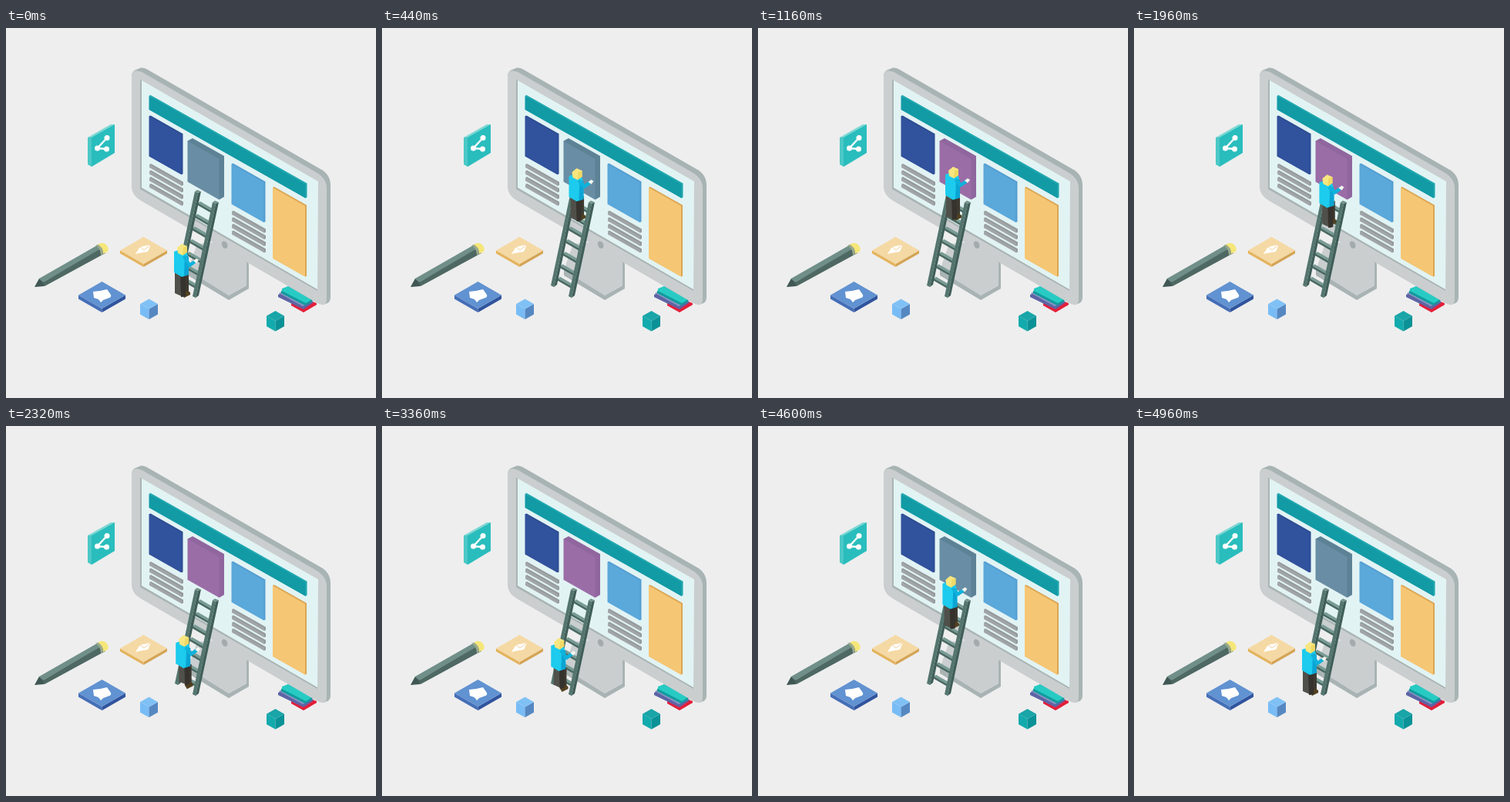
These frames come from a looping animation (480 px wide and 480 px high, 5 s). An HTML page:

```html
<!DOCTYPE html>
<html lang="en">
<head>
<meta charset="utf-8">
<title>Painting the page</title>
<style>
  html, body { margin: 0; width: 100%; height: 100%; overflow: hidden; background: #eee; }
  svg { display: block; width: 100%; height: 100%; }
</style>
</head>
<body>
<svg viewBox="0 0 480 480">
  <g id="stack">
    <path d="M370 357L390 352 403 357V359L386 369 370 360Z" fill="#e41f3a"/>
    <path d="M353 346L370 337 399 356 386 365 353 349Z" fill="#5d63a4"/>
    <path d="M354 344L369 336 399 354 385 361Z" fill="#8794c2"/>
    <path d="M357 341L366 335 397 352V355L388 360 357 344Z" fill="#129b9e"/>
    <path d="M358 338L366 335 397 352 389 357 358 341Z" fill="#27cbc3"/>
  </g>
  <g id="monitor">
    <path d="M236 314L289 347 313 333V302L272 278 248 280Z" fill="#cacecf"/>
    <path d="M236 314V321L289 353 315 338V304L312 302V334L289 347Z" fill="#a9b3b3"/>
    <path d="M163 63Q163 56 169 54L175 51.500Q178 51 182 53L408 183Q421 190 421 204V349Q421 355 417 357L411 359 170 70Z" fill="#a8b4b3"/>
    <path d="M163 63Q163 52 176 57L402 187Q416 195 416 208V352Q416 363 404 357L175 224Q163 217 163 206Z" fill="#cacecf"/>
    <path d="M174 67L176 68V207L404 339V341L174 209Z" fill="#a8b4b3"/>
    <path d="M176 68L405 199 404 339 176 207Z" fill="#e2f3f4"/>
    <ellipse cx="283.500" cy="281.500" rx="3.500" ry="5" transform="rotate(-25 283 281)" fill="#a4abad"/>
  </g>
  <g id="page"></g>
  <g id="share">
    <path d="M106 142L136 125 141 125 112 142Z" fill="#7cd8d4"/>
    <path d="M106 142L111 142V180L106 177Z" fill="#4cc8c6"/>
    <path d="M111 142L141 125V162L111 180Z" fill="#2abdbd"/>
    <path d="M131 142.500L118.500 156 130.500 157" fill="none" stroke="#fff" stroke-width="2.500"/>
    <g fill="#fff"><circle cx="131" cy="142.500" r="3.500"/><circle cx="118.500" cy="156" r="3.500"/><circle cx="130.500" cy="157" r="3.500"/></g>
  </g>
  <g id="pencil">
    <path d="M37 336L43 325 53 332 49 335Z" fill="#3f5854"/>
    <path d="M43 325L120 281Q124 279 127 285L48 330Z" fill="#708f89"/>
    <path d="M48 330L125 285 129 292 50 335Z" fill="#4e6862"/>
    <path d="M119 281Q125 277 130 281 134 286 132 290L126 293Q126 285 119 281Z" fill="#f5e678"/>
    <path d="M119 281Q126 284 126 293L123 295Q123 286 116 282Z" fill="#9aa98c"/>
  </g>
  <g id="tiles"></g>
  <path d="M168 293L174 284 188 281 184 290Z" fill="#fff"/>
  <path d="M174 284L179 288 188 281" fill="none" stroke="#f0d09a"/>
  <path d="M113 342L122 341 131 339 136 346Q137 349 134 350L126 353 123 356 120 352 114 350Z" fill="#fff"/>
  <g id="cubes"></g>
  <g id="ladder"></g>
  <g id="man">
    <g id="rightLeg">
      <path d="M228 317L237 318V343L229 347Z" fill="#3d3931"/>
      <path d="M228 344L236 341 239 343V346L231 350Z" fill="#51401f"/>
    </g>
    <g id="leftLeg">
      <path d="M219 314L230 319V349L219 344Z" fill="#50504b"/>
      <path d="M226 318L233 319V348L227 349Z" fill="#36322d"/>
    </g>
    <path d="M218 290L224 288 235 292 237 299V320L228 323 218 317Z" fill="#1ccbed"/>
    <path d="M232 295L237 297V320L231 322Z" fill="#0ba4d4"/>
    <path id="arm" fill="none" stroke="#0fb2dc" stroke-width="4.500" stroke-linejoin="round"/>
    <path id="hand" d="M-3 0L1 -3 4 -1 1 3Z" fill="#f4f7f0"/>
    <path d="M222 285L228 280 235 283 235 291 229 295 223 292Z" fill="#f7e680"/>
    <path d="M230 285L235 283V291L229 295Z" fill="#efd965"/>
  </g>
</svg>
<script>
const $ = id => document.getElementById(id);

function poly(parent, points, fill) {
  const shape = document.createElementNS("http://www.w3.org/2000/svg", "polygon");
  shape.setAttribute("points", points.join(" "));
  shape.setAttribute("fill", fill);
  $(parent).append(shape);
  return shape;
}

// Slab lying on the tilted screen; depth pushes its far edges up and right.
function slab(x, y, w, h, depth, face, edge) {
  const drop = w * 0.565, lift = depth * 0.55;
  const side = poly("page", [
    [x, y], [x + depth, y - lift], [x + w + depth, y + drop - lift],
    [x + w + depth, y + drop + h - lift], [x + w, y + drop + h]
  ], edge);
  const front = poly("page", [
    [x, y], [x + w, y + drop], [x + w, y + drop + h], [x, y + h]
  ], face);
  return { front, side };
}

// Block seen from above: x, y is the middle of its top face.
function block(group, x, y, rx, ry, h, top, left, right) {
  poly(group, [[x - rx, y], [x, y + ry], [x, y + ry + h], [x - rx, y + h]], left);
  poly(group, [[x + rx, y], [x, y + ry], [x, y + ry + h], [x + rx, y + h]], right);
  poly(group, [[x - rx, y], [x, y - ry], [x + rx, y], [x, y + ry]], top);
}

slab(185.5, 88, 203, 18, 2, "#129aa5", "#20a9b0");
slab(185.5, 114.5, 42, 52, 2, "#31529c", "#2d4c92");
const panel = slab(235.5, 146.5, 41, 53, 6.5, "#698da4", "#5d8296");
slab(292.5, 176.5, 42, 52, 2, "#5ba8db", "#549dd0");
slab(346, 207, 42, 92, 2, "#f5c674", "#dba653");
for (let i = 0; i < 4; i++) {
  slab(186, 177 + i * 8.6, 42, 4, 2, "#a1a5a8", "#949a9c");
  slab(293, 238 + i * 8.6, 42, 4, 2, "#a1a5a8", "#949a9c");
}

block("tiles", 178.500, 288.500, 30.500, 17.500, 4, "#f5d9a5", "#e5b35d", "#d4a454");
block("tiles", 124.500, 346.500, 30.500, 17.500, 5, "#6192d1", "#456fb7", "#30549d");
block("cubes", 185.500, 358, 11.500, 6.500, 13.500, "#80c1f5", "#78bcf5", "#5588c2");
block("cubes", 349.500, 373.500, 11.500, 6.500, 13.500, "#1aa5a8", "#12aaac", "#0a9297");

for (let i = 0; i < 7; i++) {
  const x = 249 - i * 3.5, y = 227 + i * 16.3;
  poly("ladder", [[x, y], [x + 3, y - 2], [x + 22, y + 9], [x + 19, y + 11]], "#789b94");
  poly("ladder", [[x, y], [x + 19, y + 11], [x + 19, y + 14], [x, y + 3]], "#486860");
}
for (const [x, y] of [[245, 212], [268, 226]]) {
  poly("ladder", [[x, y], [x + 4, y + 2], [x - 22, y + 124], [x - 26, y + 122]], "#54756e");
  poly("ladder", [[x + 4, y + 2], [x + 8, y], [x - 18, y + 121], [x - 22, y + 124]], "#3f5e57");
  poly("ladder", [[x, y], [x + 3, y - 2], [x + 8, y], [x + 4, y + 2]], "#73928b");
}

const LOOP = 5000;
const ramp = (t, start, end) => Math.min(1, Math.max(0, (t - start) / (end - start)));
const mix = (a, b, k) => `rgb(${a.map((v, i) => Math.round(v + (b[i] - v) * k))})`;

function draw(now) {
  const t = now % LOOP;
  const height = ramp(t, 20, 450) - ramp(t, 1915, 2360)
               + ramp(t, 3340, 3760) - ramp(t, 4540, 4960);
  const paint = ramp(t, 1000, 1160) - ramp(t, 3880, 4080);

  const climbing = height > 0 && height < 1;
  const step = climbing ? Math.sin(height * Math.PI * 6) : 0;
  const lean = 3 * Math.abs(step);
  $("man").setAttribute("transform", `translate(${25 * height} ${-100 * height})`);
  $("leftLeg").setAttribute("transform", `translate(${lean} ${-Math.max(0, step) * 4})`);
  $("rightLeg").setAttribute("transform", `translate(${lean / 2} ${Math.min(0, step) * 4})`);

  const handX = 246, handY = 302 - 4 * ramp(height, 0, 0.15) - Math.abs(step);
  $("arm").setAttribute("d", `M231 296L238 ${handY + 6} ${handX - 1} ${handY + 1}`);
  $("hand").setAttribute("transform", `translate(${handX} ${handY})`);

  panel.front.setAttribute("fill", mix([105, 141, 164], [154, 109, 167], paint));
  panel.side.setAttribute("fill", mix([93, 130, 150], [144, 102, 158], paint));
  requestAnimationFrame(() => draw(performance.now()));
}
draw(0);
</script>
</body>
</html>
```
